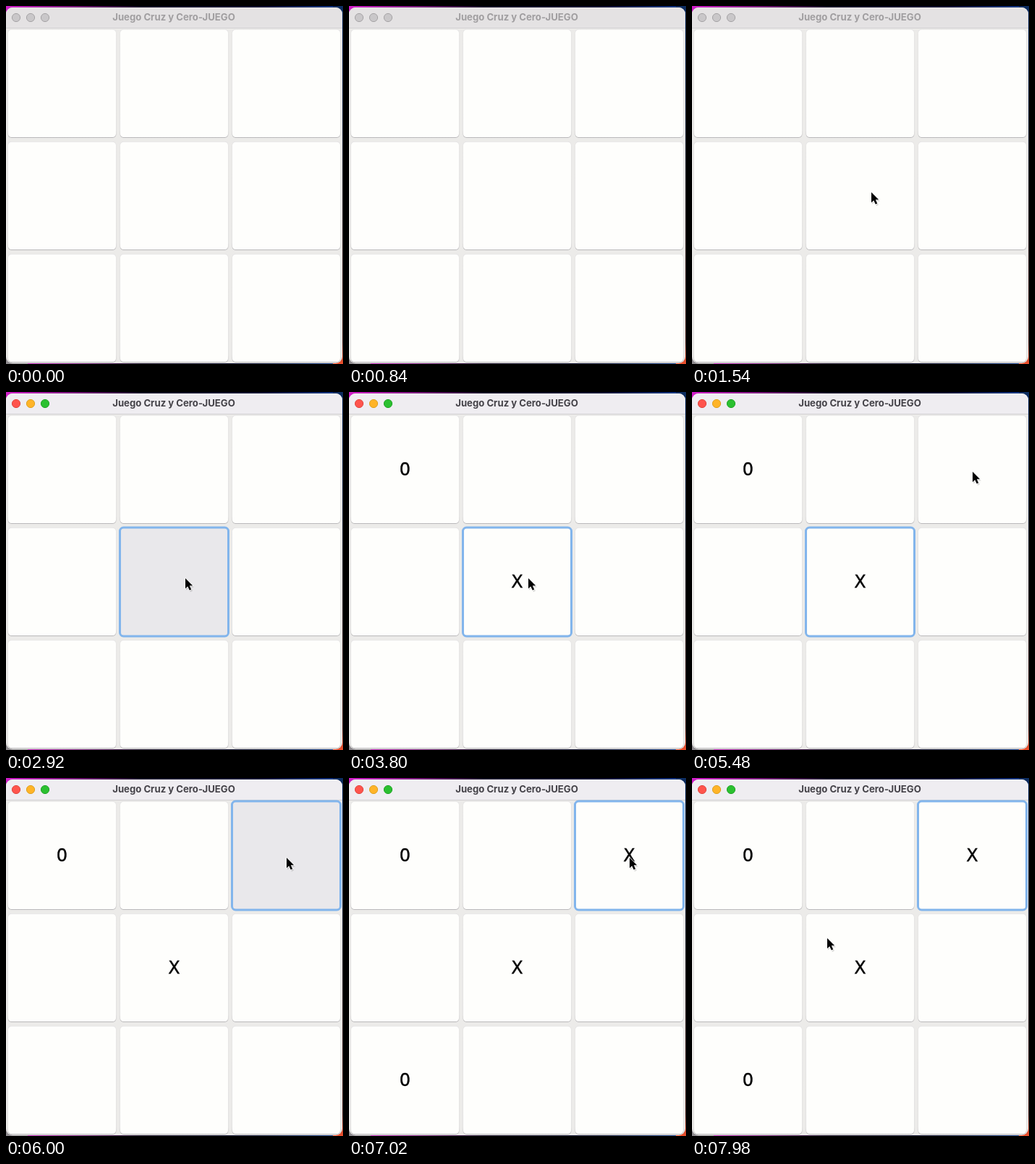
These frames come from a looping animation (466 by 494 pixels, 8000 ms). An HTML page:

```html
<!DOCTYPE html>
<html lang="es">
<head>
<meta charset="utf-8">
<title>Juego Cruz y Cero-JUEGO</title>
<style>
html, body { margin: 0; width: 100%; height: 100%; overflow: hidden; background: #101428; }
svg { display: block; width: 466px; height: 494px; }
.title { font: 700 13.15px Inter, "Liberation Sans", sans-serif; text-anchor: middle; }
.mark { font: 24px "DejaVu Sans", sans-serif; text-anchor: middle; fill: #000; stroke: #000; stroke-width: .4px; }
</style>
</head>
<body>
<svg id="stage" viewBox="0 0 466 494">
  <defs>
    <linearGradient id="sky">
      <stop offset="0" stop-color="#d01ec8"/>
      <stop offset=".2" stop-color="#7a1a7c"/>
      <stop offset=".4" stop-color="#140c24"/>
      <stop offset=".75" stop-color="#0a1030"/>
      <stop offset="1" stop-color="#0c3a8c"/>
    </linearGradient>
    <linearGradient id="edge" x2="0" y2="1">
      <stop offset="0" stop-color="#0c2c60"/>
      <stop offset=".5" stop-color="#3c3a40"/>
      <stop offset=".94" stop-color="#5a3430"/>
      <stop offset="1" stop-color="#f0502c"/>
    </linearGradient>
    <linearGradient id="rim" x2="0" y2="1">
      <stop offset="0" stop-color="#e2e1e2"/>
      <stop offset=".93" stop-color="#dad9da"/>
      <stop offset="1" stop-color="#b8b7b9"/>
    </linearGradient>
    <clipPath id="win"><rect y="2" width="465" height="491" rx="9"/></clipPath>
  </defs>
  <rect width="466" height="494" fill="url(#sky)"/>
  <rect y="470" width="30" height="24" fill="#8d8a8e"/>
  <rect x="452" width="14" height="494" fill="url(#edge)"/>
  <g clip-path="url(#win)">
    <rect width="466" height="494" fill="#ecebe9"/>
    <rect id="bar" width="466" height="30"/>
    <rect y="30" width="466" height="1" fill="#d2d0d2"/>
    <g id="lights" stroke-width="1"></g>
    <text id="title" class="title" x="232" y="20">Juego Cruz y Cero-JUEGO</text>
    <g id="board"></g>
    <rect id="ring" width="150" height="150" rx="5" fill="none" stroke="#82b5ec" stroke-width="3"/>
  </g>
  <g id="cursor">
    <path d="M1 1.5V16.5L4.5 13.5L7 19L10 17.5L7.6 12.5H12Z" fill="#000" opacity=".14"/>
    <path d="M0 0V14.3L3.3 11.3L5.7 16.6L8.2 15.5L5.8 10.3H10.2Z" fill="#000" stroke="#fff" stroke-width="1.3" stroke-linejoin="round" paint-order="stroke"/>
  </g>
</svg>
<script>
const LOOP = 8000, PITCH = 155;
const $ = id => document.getElementById(id);

function set(el, attrs) {
  for (const key in attrs) el.setAttribute(key, attrs[key]);
}
function add(parent, tag, attrs) {
  const el = document.createElementNS("http://www.w3.org/2000/svg", tag);
  set(el, attrs);
  return parent.appendChild(el);
}

const cells = Array.from({ length: 9 }, (_, i) => {
  const x = 2.5 + PITCH * (i % 3), y = 32 + PITCH * Math.floor(i / 3);
  add($("board"), "rect", { x, y, width: 150, height: 150, rx: 5, fill: "url(#rim)" });
  const face = add($("board"), "rect", { x: x + .5, y: y + .7, width: 149, height: 148.3, rx: 4.6 });
  const mark = add($("board"), "text", { class: "mark", x: x + 75, y: y + 83 });
  return { x, y, face, mark };
});

const lamps = [["#ff544d", "#e0443e"], ["#ffb428", "#dea01e"], ["#2bc030", "#20a426"]];
const lights = lamps.map((_, i) => add($("lights"), "circle", { cx: 14 + 20 * i, cy: 16, r: 5.6 }));

// Each turn: pressed cell, press time, release time, reply cell
const turns = [
  { cell: 4, down: 2870, up: 2990, reply: 0 },
  { cell: 2, down: 5950, up: 6070, reply: 6 }
];

const easeIn = u => u ** 1.5, easeOut = u => 1 - (1 - u) ** 2;
const moves = [
  { t: [860, 1460], from: [310, 494], to: [248, 257], ease: easeOut },
  { t: [4560, 5020], from: [248, 257], to: [334, 152], ease: easeIn },
  { t: [5020, 5300], from: [334, 152], to: [388, 110], ease: easeOut },
  { t: [7400, 7980], from: [388, 110], to: [187, 221], ease: easeIn }
];

function pointer(t) {
  const move = moves.filter(m => t >= m.t[0]).pop();
  if (!move) return [-40, -40];
  const [begin, end] = move.t;
  const u = move.ease(Math.min(1, (t - begin) / (end - begin)));
  return move.from.map((v, i) => v + (move.to[i] - v) * u);
}

function draw(t) {
  const active = t >= turns[0].down;
  set($("bar"), { fill: active ? "#efedf1" : "#e4e2e3" });
  set($("title"), { fill: active ? "#444248" : "#a09ea0" });
  lights.forEach((el, i) => set(el, {
    fill: active ? lamps[i][0] : "#c9c7c9",
    stroke: active ? lamps[i][1] : "#a5a3a5"
  }));

  const marks = {};
  let focus = null, held = -1;
  for (const { cell, down, up, reply } of turns) {
    if (t < down) continue;
    focus = cells[cell];
    if (t < up) held = cell;
    else { marks[cell] = "X"; marks[reply] = "0"; }
  }
  cells.forEach(({ face, mark }, i) => {
    set(face, { fill: i === held ? "#e9e8eb" : "#fefefc" });
    mark.textContent = marks[i] || "";
  });
  set($("ring"), focus ? { x: focus.x, y: focus.y, opacity: 1 } : { opacity: 0 });

  const [x, y] = pointer(t);
  set($("cursor"), { transform: `translate(${x} ${y})` });
}

const start = performance.now();
function tick() {
  draw((performance.now() - start) % LOOP);
  requestAnimationFrame(tick);
}
tick();
</script>
</body>
</html>
```
